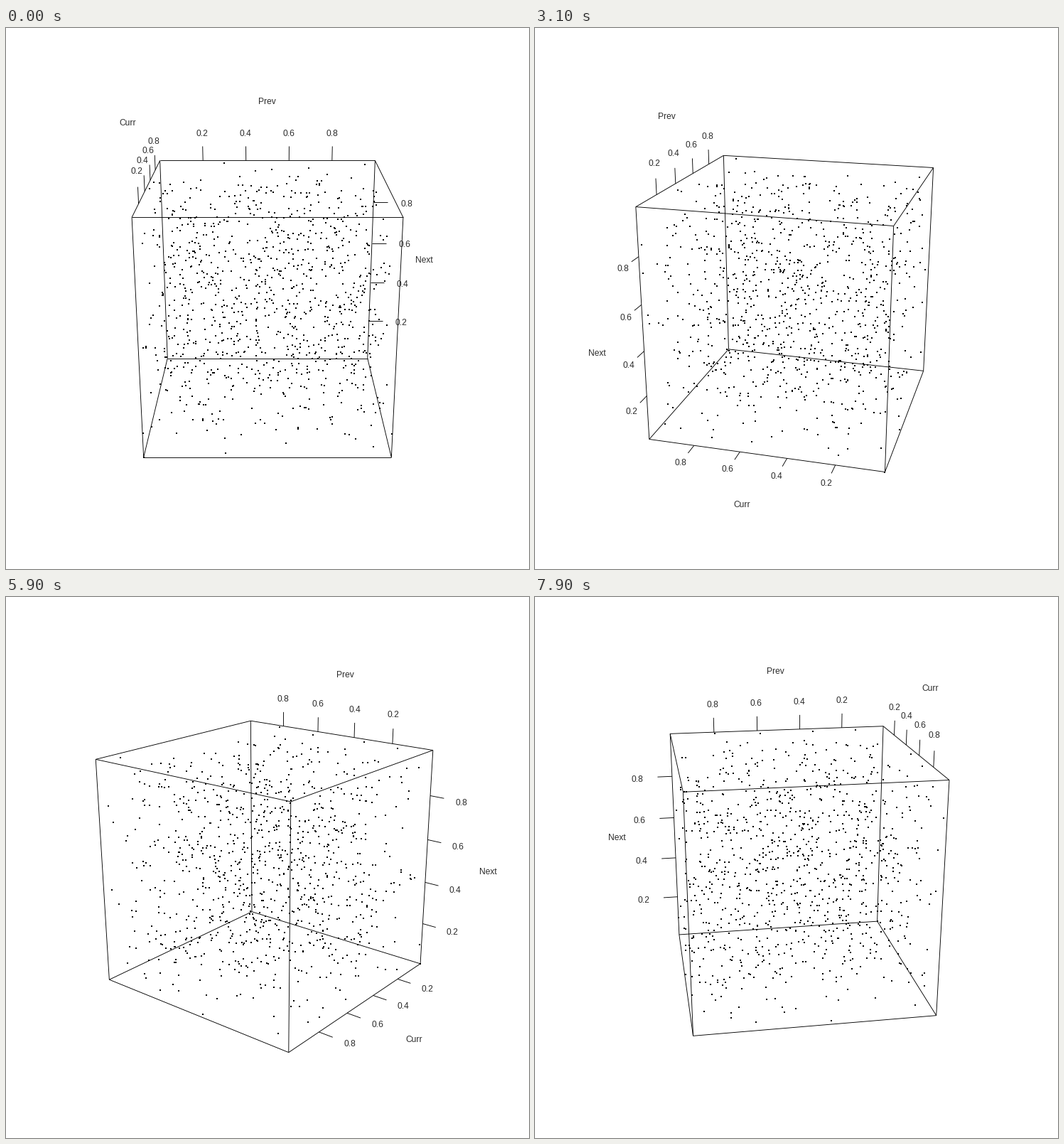
A matplotlib script for the animation above (8000 ms loop, 736 by 761 pixels).

```python
import itertools

import matplotlib.pyplot as plt
import numpy as np
from matplotlib.animation import FuncAnimation
from matplotlib.collections import LineCollection

W, H, DPI = 736, 761, 100
FRAMES, INTERVAL = 80, 100
STEP = np.radians(2.4)            # turn per frame
TILT = np.radians(20)             # camera elevation
DIST = 4.238                      # camera distance for a unit cube
FOCAL = W / 2 / np.tan(np.radians(15))
TICK = 1 / 15
TICKS = (0.2, 0.4, 0.6, 0.8)
NAMES = ("Prev", "Curr", "Next")
PX = 72 / DPI
INK, TEXT = "black", "#2b2b2b"


def randu(n, seed):
    """Multiplicative generator whose triples fall on 15 planes."""
    values = []
    for _ in range(n):
        seed = 65539 * seed % 2**31
        values.append(seed / 2**31)
    return np.array(values)


def project(pts, turn):
    """Unit-cube coordinates to stage pixels."""
    x, y, z = (np.atleast_2d(pts) - 0.5).T
    c, s = np.cos(turn), np.sin(turn)
    x, y = x * c - y * s, x * s + y * c
    ct, st = np.cos(TILT), np.sin(TILT)
    scale = FOCAL / (DIST + y * ct - z * st)
    return np.column_stack([W / 2 + x * scale,
                            H / 2 - (y * st + z * ct) * scale])


def axis_layout(turn):
    """For each axis: edge corner, tick axis, second outward axis."""
    far_p = 1 if np.sin(turn) > 0 else 0
    far_c = 1 if np.cos(turn) > 0 else 0
    return (
        ((0, far_c, 1), 2, 1),
        ((0, 0, 1), 2, 0) if far_p == 0 else ((0, 0, 0), 0, 2),
        ((1 - far_p, far_c, 0), 0, 1),
    )


seq = randu(1001, 20011)
cloud = np.column_stack([seq[:-2], seq[1:-1], seq[2:]])
cloud = np.vstack([[0, 0, 0], cloud])

corners = list(itertools.product((0, 1), repeat=3))
edges = np.array([(a, b) for a, b in itertools.combinations(corners, 2)
                  if sum(i != j for i, j in zip(a, b)) == 1], float)

fig = plt.figure(figsize=(W / DPI, H / DPI), dpi=DPI, facecolor="white")
ax = fig.add_axes([0, 0, 1, 1])
ax.set(xlim=(0, W), ylim=(H, 0))
ax.axis("off")

dots, = ax.plot([], [], "s", color=INK, ms=2.2 * PX, mew=0)
lines = LineCollection([], colors=INK, linewidths=0.9 * PX)
ax.add_collection(lines)


def label(text):
    return ax.text(0, 0, text, family="Liberation Sans", size=12 * PX,
                   color=TEXT, ha="center", va="baseline")


titles = [label(name) for name in NAMES]
numbers = [[label(f"{t:.1f}") for t in TICKS] for _ in NAMES]


def place(text, pt, turn, shift=0):
    x, y = project(pt, turn)[0]
    text.set_position((x + shift - 0.8, y + 5.5))


def draw(frame):
    turn = frame * STEP
    dots.set_data(*project(cloud, turn).T)
    segments = [project(edge, turn) for edge in edges]

    for i, (corner, main, side) in enumerate(axis_layout(turn)):
        base = np.array(corner, float)
        out, out2 = np.zeros(3), np.zeros(3)
        out[main] = TICK * (2 * corner[main] - 1)
        out2[side] = TICK * (2 * corner[side] - 1)

        # labels pointing sideways are pushed clear of their tick
        lean = np.cos(turn) * out[0] / TICK
        shift = 7.7 * lean * abs(lean) ** 0.6

        for t, text in zip(TICKS, numbers[i]):
            base[i] = t
            segments.append(project([base, base + out], turn))
            place(text, base + 2 * out, turn, shift)
        base[i] = 0.5
        place(titles[i], base + 4 * out + out2, turn)

    lines.set_segments(segments)
    return [dots, lines, *titles, *itertools.chain(*numbers)]


anim = FuncAnimation(fig, draw, frames=FRAMES, interval=INTERVAL,
                     repeat=True, repeat_delay=0, blit=False)
plt.show()
```
